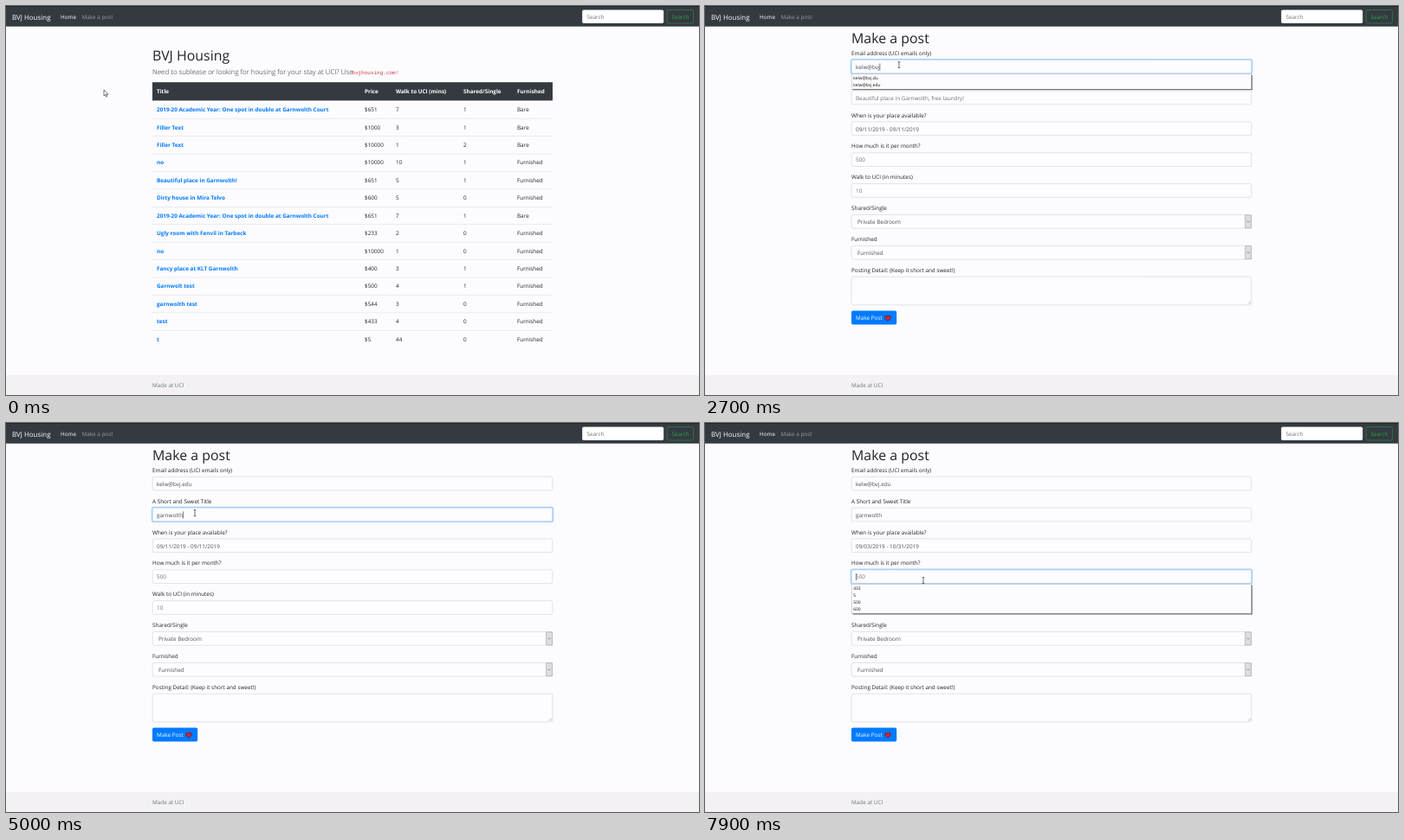
Write an HTML page that moves like this. It is 800 px wide and 450 px high and loops after 8 s.

```html
<!DOCTYPE html>
<html lang="en">
<head>
<meta charset="utf-8">
<title>Housing board</title>
<style>
  html, body { margin: 0; width: 100%; height: 100%; overflow: hidden; background: #fcfbfe; }
  svg { display: block; width: 100vw; height: 100vh; }
  text { font-family: "Open Sans", sans-serif; text-rendering: geometricPrecision; white-space: pre; }
  .cal text { font-family: "Liberation Sans", Arial, sans-serif; }
  text.code { font-family: "Liberation Mono", monospace; }
</style>
</head>
<body>
<svg id="stage" viewBox="0 0 800 450"></svg>
<script>
(() => {
const LOOP = 8000, STEP = 100;
const BASE = 6.36, INK = '#212529', VALUE = '#495057', MUTED = '#6c757d', DARK = '#343a40', PAGE = '#fcfbfe';
const LEFT = 169, PITCH = 35.86;
const stage = document.getElementById('stage');
const measure = document.createElement('canvas').getContext('2d');

// y is the vertical centre of the capitals
function text(x, y, str, { size = BASE, fill = INK, weight = 400, anchor = 'start', cls = '' } = {}) {
  return `<text class="${cls}" x="${x}" y="${y + size * 0.36}" font-size="${size}" font-weight="${weight}" ` +
    `fill="${fill}" text-anchor="${anchor}">${str}</text>`;
}
function rect(x, y, w, h, fill, extra = '') {
  return `<rect x="${x}" y="${y}" width="${w}" height="${h}" fill="${fill}" ${extra}/>`;
}
function line(d, stroke, width, extra = '') {
  return `<path d="${d}" fill="none" stroke="${stroke}" stroke-width="${width}" ${extra}/>`;
}
function textWidth(str) {
  measure.font = '100px "Open Sans", sans-serif';
  return measure.measureText(str).width * BASE / 100;
}

// ---- page frame ----
function pageFrame(hover) {
  return rect(0, 0, 800, 450, PAGE) + rect(0, 0, 800, 23.7, DARK) + rect(0, 0, 800, 0.8, '#1d2024') +
    text(7, 13, 'BVJ Housing', { size: 7.95, fill: '#fff' }) +
    text(63, 13, 'Home', { fill: '#fff' }) +
    text(87.5, 13, 'Make a post', { fill: hover ? '#ccced0' : '#9a9da0' }) +
    rect(665.2, 4.5, 94, 15.5, '#fff', 'rx="1.7"') + text(670.5, 12.7, 'Search', { fill: MUTED }) +
    rect(763.2, 4.5, 30.4, 15.5, 'none', 'rx="1.7" stroke="#28a745" stroke-width=".5"') +
    text(778.4, 12.7, 'Search', { fill: '#28a745', anchor: 'middle' }) +
    rect(0, 427, 800, 23, '#f3f1f4') + text(LEFT, 439, 'Made at UCI', { fill: MUTED });
}

// ---- listing page ----
const COLS = [174, 414, 450, 528, 590];
const LONG = '2019-20 Academic Year: One spot in double at Garnwolth Court';
const ROWS = [
  [LONG, 651, 7, 1, 0], ['Filler Text', 1000, 3, 1, 0], ['Filler Text', 10000, 1, 2, 0],
  ['no', 10000, 10, 1, 1], ['Beautiful place in Garnwolth!', 651, 5, 1, 1],
  ['Dirty house in Mira Telvo', 600, 5, 0, 1], [LONG, 651, 7, 1, 0],
  ['Ugly room with Fenvil in Tarbeck', 233, 2, 0, 1], ['no', 10000, 1, 0, 1],
  ['Fancy place at KLT Garnwolth', 400, 3, 1, 1], ['Garnwolt test', 500, 4, 1, 1],
  ['garnwolth test', 544, 3, 0, 1], ['test', 433, 4, 0, 1], ['t', 5, 44, 0, 1]
];
function listing() {
  let out = text(LEFT, 57, 'BVJ Housing', { size: 15.9 }) +
    text(LEFT, 76.2, 'Need to sublease or looking for housing for your stay at UCI? Use', { size: 7.95, weight: 300 }) +
    text(399.3, 77, 'bvjhousing.com!', { size: 6, fill: '#cb3b45', cls: 'code' }) +
    rect(LEFT, 88.2, 462, 21.2, DARK);
  ['Title', 'Price', 'Walk to UCI (mins)', 'Shared/Single', 'Furnished'].forEach((h, i) => {
    out += text(COLS[i], 99.2, h, { fill: '#fff', weight: 700 });
  });
  ROWS.forEach(([title, price, walk, shared, furnished], r) => {
    const y = 119.9 + r * 20.42;
    if (r) out += rect(LEFT, y - 10.4, 462, 0.6, '#dee2e6');
    out += text(COLS[0], y, title, { fill: '#007bff', weight: 700 });
    ['$' + price, walk, shared, furnished ? 'Furnished' : 'Bare'].forEach((v, i) => {
      out += text(COLS[i + 1], y, v);
    });
  });
  return out;
}

// ---- form page ----
const LABELS = ['Email address (UCI emails only)', 'A Short and Sweet Title', 'When is your place available?',
  'How much is it per month?', 'Walk to UCI (in minutes)', 'Shared/Single', 'Furnished',
  'Posting Detail: (Keep it short and sweet!)'];
const HINTS = ['name@bvj.edu', 'Beautiful place in Garnwolth, free laundry!', '', '500', '10'];
const EMAIL = 'kelw@bvj.edu', TITLE = 'garnwolth';
const OLD_DATES = '09/11/2019 - 09/11/2019', NEW_DATES = '09/03/2019 - 10/31/2019';
const fieldY = i => 62.2 + i * PITCH;

function select(i, value) {
  const y = fieldY(i);
  return text(176, y + 8, value, { fill: VALUE }) +
    rect(623.7, y + 0.4, 7, 15, '#dddcde', 'stroke="#a5a5a8" stroke-width=".6"') +
    line(`M625.8 ${y + 7.2}l1.4 1.4l1.4 -1.4`, '#555', 0.6);
}

function form(values, focus, glow, caret) {
  let out = text(LEFT, 37, 'Make a post', { size: 15.9 });
  LABELS.forEach((label, i) => {
    out += text(LEFT, 54.6 + i * PITCH, label);
    const on = i === focus, y = fieldY(i), h = i === 7 ? 32.6 : 15.7;
    if (on) out += rect(LEFT - 0.6, y - 0.6, 463.2, h + 1.2, 'none',
      `rx="2.2" stroke="#007bff" stroke-opacity=".3" stroke-width="1.4" opacity="${glow}"`);
    out += rect(LEFT + 0.2, y, 461.6, h, '#fdfcfe',
      `rx="1.7" stroke="${on ? '#80bdff' : '#ced4da'}" stroke-width=".6"`);
    if (i < 5) out += text(174, y + 8.3, values[i] || HINTS[i], { fill: values[i] ? VALUE : MUTED });
    if (on && caret) out += rect(174 + textWidth(values[i]), y + 4.2, 0.6, 8.2, '#333');
  });
  return out + select(5, 'Private Bedroom') + select(6, 'Furnished') +
    line('M626.8 344.6l3 -3M628.6 344.6l1.2 -1.2', '#888', 0.5) +
    rect(LEFT, 352.4, 52.2, 16, '#007bff', 'rx="1.7"') + text(174, 361, 'Make Post', { fill: '#fff' }) +
    '<path d="M211 364.2C208.6 362.4 207.5 361 207.7 359.6C208 358 210.2 357.8 211 359.4' +
    'C211.8 357.8 214 358 214.3 359.6C214.5 361 213.4 362.4 211 364.2Z" fill="#e0202c" stroke="#43202c" stroke-width=".7"/>';
}

function suggestions(field, items) {
  const y = fieldY(field) + 16.6, h = items.length * 8.3 + 1;
  return rect(169.4, y, 461.6, h, '#fcfbfd', 'stroke="#b5b5b8" stroke-width=".5"') +
    line(`M631.3 ${y + 1}V${y + h + 0.3}H170.5`, '#77777b', 1.3) +
    items.map((s, i) => text(171.2, y + 4.4 + i * 8.3, s, { size: 4.9, fill: '#111' })).join('');
}

// ---- date range picker ----
const MONTHS = [{ name: 'Sep 2019', month: 8, x: 180, lead: 7 }, { name: 'Oct 2019', month: 9, x: 280.3, lead: 2 }];
const CELL_W = 13.35, CELL_H = 11.2, WEEK_Y = 185;
const START = +new Date(2019, 8, 3), END = +new Date(2019, 9, 31), TODAY = +new Date(2019, 8, 11);
const dayAt = (m, i) => new Date(2019, m.month, 1 - m.lead + i);

function hovered(p) {
  const row = Math.round((p.y - WEEK_Y) / CELL_H);
  for (const m of MONTHS) {
    const col = Math.round((p.x - m.x) / CELL_W);
    if (col < 0 || col > 6 || row < 0 || row > 5) continue;
    const d = dayAt(m, row * 7 + col);
    if (d.getMonth() === m.month) return +d;
  }
  return 0;
}

function picker(t, p) {
  const picking = t >= 5900 && t < 6600, done = t >= 6600;
  const from = t < 5900 ? TODAY : START;
  const over = hovered(p), to = done ? END : picking ? over : TODAY;
  const opt = { size: 5, anchor: 'middle' };
  let out = rect(169.2, 153, 202, 116.8, '#fefdff', 'rx="1.6" stroke="#d8d8da" stroke-width=".6"') +
    '<path d="M172.5 153L175.4 150.2L178.3 153" fill="#fefdff" stroke="#ccc" stroke-width=".5"/>' +
    line('M180.6 160.4l-2 2l2 2M360.1 160.4l2 2l-2 2', '#111', 0.9);
  for (const m of MONTHS) {
    out += text(m.x + 3 * CELL_W, 162.5, m.name, { ...opt, weight: 700 });
    ['Su', 'Mo', 'Tu', 'We', 'Th', 'Fr', 'Sa'].forEach((d, i) => {
      out += text(m.x + i * CELL_W, 173.8, d, { ...opt, weight: 700 });
    });
    for (let i = 0; i < 42; i++) {
      const d = dayAt(m, i), x = m.x + i % 7 * CELL_W, y = WEEK_Y + Math.floor(i / 7) * CELL_H;
      const off = d.getMonth() !== m.month;
      const active = !off && (+d === from || (done && +d === END));
      const fill = off ? '' : active ? '#357ebd' : d > from && d <= to ? '#ebf4f8' : +d === over ? '#eee' : '';
      if (fill) out += rect(x - 6.7, y - 5.6, CELL_W, CELL_H, fill, active ? 'rx="1.4"' : '');
      out += text(x, y, d.getDate(), { ...opt, fill: active ? '#fff' : off ? '#999' : '#111' });
    }
  }
  out += rect(169.4, 250.2, 201.6, 0.6, '#ddd') +
    text(313.4, 260.4, done ? NEW_DATES : OLD_DATES, { size: 5, anchor: 'end' }) +
    text(331.8, 260.4, 'Cancel', { ...opt, weight: 700 }) +
    `<g opacity="${picking ? 0.65 : 1}">` + rect(347, 254.8, 20.6, 11.3, '#007bff', 'rx="1.2"') +
    text(357.3, 260.4, 'Apply', { ...opt, weight: 700, fill: '#fff' }) + '</g>';
  return `<g class="cal">${out}</g>`;
}

// ---- pointer ----
const PATH = [[0, 113, 97], [100, 112, 89], [300, 106, 23], [400, 104, 12], [500, 104, 12], [600, 166, 61],
  [1100, 224, 68], [3200, 224, 68], [3400, 218, 99], [3800, 218, 104], [5100, 218, 104], [5400, 214, 142],
  [5500, 214, 142], [5800, 207, 197], [5900, 207, 197], [6000, 211, 185], [6500, 333, 231], [6600, 333, 231],
  [6900, 357, 261], [7000, 357, 261], [7500, 252, 182], [LOOP, 252, 182]];
function pointerAt(t) {
  const i = PATH.findIndex(k => k[0] > t), [t0, x0, y0] = PATH[i - 1], [t1, x1, y1] = PATH[i];
  const u = (t - t0) / (t1 - t0), e = u * u * (3 - 2 * u);
  return { x: x0 + (x1 - x0) * e, y: y0 + (y1 - y0) * e };
}
const SHAPES = {
  arrow: '<path d="M0 0V7L1.6 5.6L2.7 8.1L3.8 7.6L2.7 5.2H4.9Z" fill="#fff" stroke="#222" stroke-width=".6"/>',
  beam: line('M-1.3 -3.4H1.3M0 -3.4V3.4M-1.3 3.4H1.3', '#333', 0.7),
  hand: '<path d="M-.6 0Q0 -.7 .6 0V3L3.4 3.6Q4 4 3.8 5.2L3.2 8H-.2L-2.5 5Q-2.2 4 -.6 5Z" fill="#fff" stroke="#222" stroke-width=".6"/>'
};
function pointer(p, kind) {
  return `<g transform="translate(${p.x} ${p.y})">${SHAPES[kind]}</g>`;
}

// ---- timeline ----
const within = (t, a, b) => t >= a && t < b;
function typed(str, t, from, to, start = 0) {
  const u = Math.min(1, (t - from + STEP) / (to - from + STEP));
  return t < from ? str.slice(0, start) : str.slice(0, start + Math.round((str.length - start) * u));
}
const FOCUS = [[0, 1200, 3900], [1, 3900, 5500], [3, 7600, LOOP]];
const CARET = [[1400, 1700], [1900, 2400], [2600, 3100], [3300, 3800], [3900, 4700], [5000, 5500], [7900, LOOP]];

function draw(t) {
  const p = pointerAt(t);
  if (t < 600) {
    const link = p.y < 18;
    stage.innerHTML = pageFrame(link) + listing() + pointer(p, link ? 'hand' : 'arrow');
    return;
  }
  const email = t < 1900 ? '' : t < 2000 ? EMAIL.slice(0, 2) : typed(EMAIL, t, 2600, 2900, 4);
  const title = typed(TITLE, t, 4300, 4700);
  const values = [email, title, t < 7000 ? OLD_DATES : NEW_DATES, '', ''];
  const [field, since] = FOCUS.find(f => within(t, f[1], f[2])) || [-1, 0];
  const glow = Math.min(1, (t - since + STEP) / 200);
  const open = within(t, 5500, 7000);

  let out = pageFrame(false) + form(values, field, glow, CARET.some(c => within(t, ...c)));
  if (within(t, 1900, 2900)) {
    const list = ['kelw@bvj.du', EMAIL];
    out += suggestions(0, t < 2000 ? [...list, 'kemo@bvj.edu'] : list);
  }
  if (within(t, 4300, 4700)) out += suggestions(1, [TITLE]);
  if (t >= 7900) out += suggestions(3, ['433', '5', '500', '600']);
  if (open) out += picker(t, p);
  const kind = open && p.y > 153 ? 'hand' : p.x < 168 || (t >= 7000 && p.y > 194) ? 'arrow' : 'beam';
  stage.innerHTML = out + pointer(p, kind);
}

let last = -1;
function tick(now) {
  const t = Math.floor(now % LOOP / STEP) * STEP;
  if (t !== last) draw(last = t);
  requestAnimationFrame(tick);
}
draw(0);
requestAnimationFrame(tick);
})();
</script>
</body>
</html>
```
